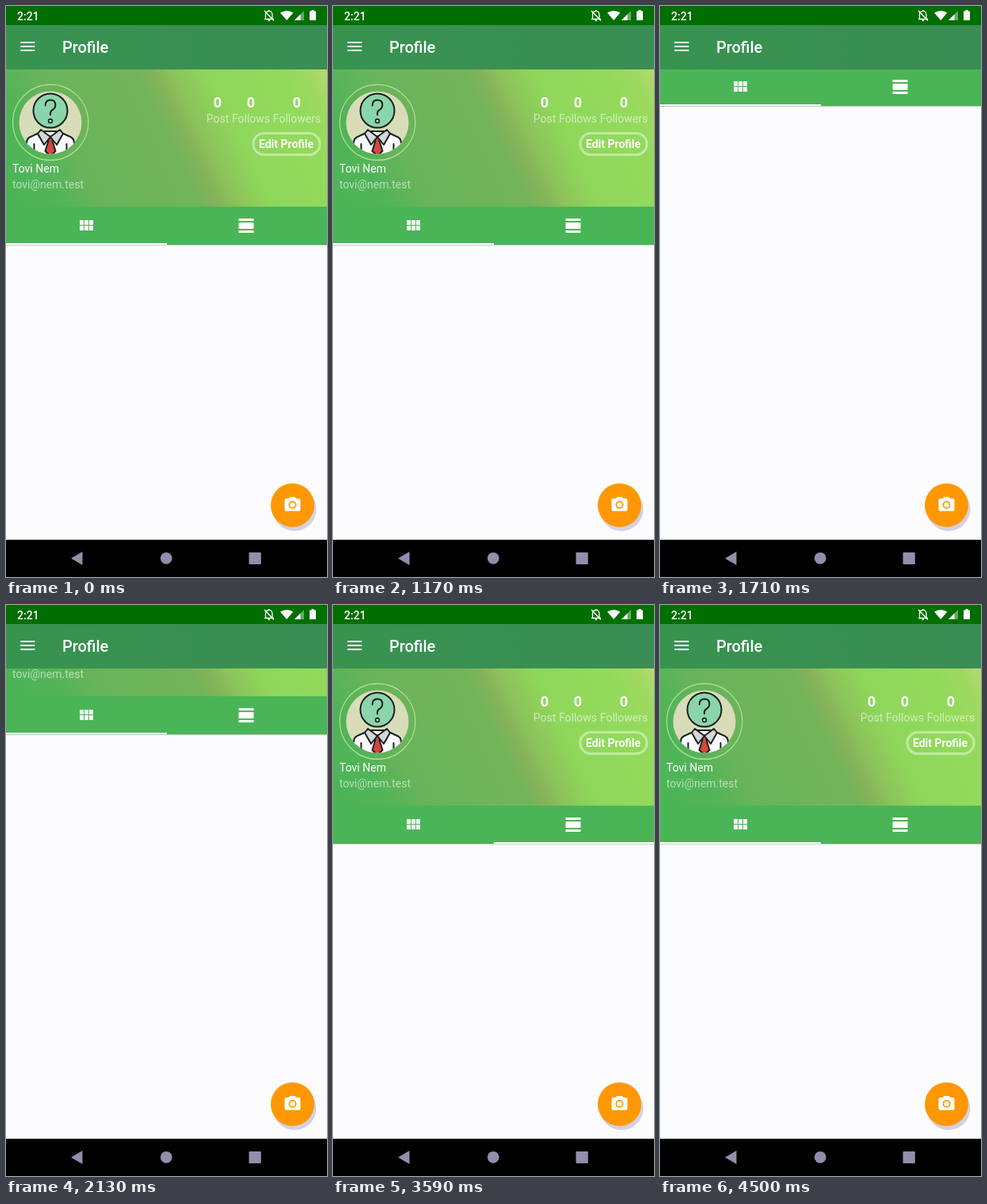
An HTML page for the animation above (4540 ms loop, 405 by 720 pixels).

```html
<!DOCTYPE html>
<html lang="en">
<head>
<meta charset="utf-8">
<title>Profile</title>
<style>
  html, body { margin: 0; width: 100%; height: 100%; overflow: hidden; background: #fcfcff; }
  #stage { position: relative; width: 405px; height: 720px; overflow: hidden; background: #fcfcff; }
  #scroll { position: absolute; left: 0; top: 80px; width: 405px; height: 222px; }
  #cover {
    height: 173px;
    background: linear-gradient(64deg, #4ab556 0%, #52b458 14%, #69b459 25%, #73b45a 51%,
      #84b259 55%, #8cc35a 60%, #8fd75b 69%, #93da5c 88%, #a0d962 95%, #b8d975 100%);
  }
  #tabs { height: 48px; background: #4ab556; border-bottom: 1px solid #c3cfcb; }
  #bar {
    position: absolute; left: 0; top: 24px; width: 405px; height: 56px;
    background: linear-gradient(90deg, #38934f, #3a8d55);
  }
  #mark { position: absolute; left: 0; top: 218.5px; width: 202.5px; height: 2px; background: #fff; }
  svg { position: absolute; left: 0; top: 0; display: block; }
  text { font-family: Roboto, sans-serif; font-size: 14px; fill: #fff; }
  .mid { text-anchor: middle; }
  .num { font-size: 18px; font-weight: 700; }
  .soft { fill: #fff; fill-opacity: .58; }
  .ink { stroke: #17211d; stroke-width: 2; stroke-linejoin: round; stroke-linecap: round; }
</style>
</head>
<body>
<div id="stage">
  <div id="scroll">
    <div id="cover"></div>
    <div id="tabs"></div>
    <svg width="405" height="222" viewBox="0 80 405 222" fill="#fff">
      <defs><clipPath id="disc"><circle cx="56" cy="147" r="39.5"/></clipPath></defs>
      <circle cx="56.2" cy="146.8" r="47.6" fill="none" stroke="#b4dfa0" stroke-width="1.2"/>
      <circle cx="56" cy="147" r="39.5" fill="#d8dcb9"/>
      <g clip-path="url(#disc)">
        <path class="ink" fill="#fbfbff" d="M26 190v-17q0-7 7-9l13-6h20l13 6q7 2 7 9v17z"/>
        <path class="ink" fill="none" d="M35.500 174v12M76.500 174v12"/>
        <path class="ink" fill="#d9443c" stroke-width="1.400" d="M52 164.500h8l-1.500 5.500 4 13-6.500 6-6.500-6 4-13z"/>
        <path class="ink" fill="#d5d6dc" d="M44 156l12 9-8 10-8-14zM68 156l-12 9 8 10 8-14z"/>
      </g>
      <circle class="ink" cx="56" cy="132" r="21.500" fill="#8bd5ac"/>
      <path class="ink" fill="none" d="M49.700 125.500q0-7 6.300-7t6.300 6.300q0 4-3.500 6t-2.800 6.500"/>
      <circle class="ink" cx="56" cy="145" r="2.400" fill="#c9ecd6" style="stroke-width:1.600"/>
      <text x="8" y="210">Tovi Nem</text>
      <text class="soft" x="8" y="229.500">tovi@nem.test</text>
      <g id="stats"></g>
      <rect x="312" y="160.500" width="84" height="27" rx="13.500" fill="none"
        stroke="#fff" stroke-opacity=".42" stroke-width="3.200"/>
      <text class="mid" x="353.500" y="179" font-weight="700">Edit Profile</text>
      <path transform="translate(89 265)" d="M4 11h5V5H4zM4 18h5v-6H4zM10 18h5v-6h-5zM16 18h5v-6h-5zM10 11h5V5h-5zM16 5v6h5V5z"/>
      <path transform="translate(291.500 265)" d="M2 21h19v-3H2zM20 8H3q-1 0-1 1v6q0 1 1 1h17q1 0 1-1V9q0-1-1-1zM2 3v3h19V3z"/>
    </svg>
    <div id="mark"></div>
  </div>
  <div id="bar"></div>
  <svg width="405" height="720" fill="#fff">
    <rect width="405" height="24" fill="#006e00"/>
    <text x="14" y="17.500" font-weight="500">2:21</text>
    <g fill="none" stroke="#fff" stroke-width="1.300">
      <path d="M327.500 16v-5q0-4 4-4.500t4.500 4.500v5M326 16.500h12M331.800 5v2M326 6l12 12.500"/>
    </g>
    <circle cx="331.800" cy="18" r="1.300"/>
    <path d="M346 8.500q8.200-5 16.400 0L354.200 18z"/>
    <path d="M376 6v12h-12z" opacity=".4"/>
    <path d="M371.500 10.500V18H364z"/>
    <path d="M385.500 5h3v1.500h2.500V18h-8V6.500h2.500z"/>
    <path transform="translate(15.300 39)" d="M3 18h18v-2H3zM3 13h18v-2H3zM3 6v2h18V6z"/>
    <text x="71" y="59" font-weight="500" style="font-size:20px">Profile</text>
    <circle cx="364" cy="634.500" r="27.500" fill="#d3d0e6"/>
    <circle cx="361.500" cy="629.500" r="27.500" fill="#ff9800"/>
    <g transform="translate(349.500 617)">
      <path fill-rule="evenodd" d="M9 2L7.170 4H4Q2 4 2 6v12q0 2 2 2h16q2 0 2-2V6q0-2-2-2h-3.170L15 2zM12 7a5 5 0 0 1 0 10a5 5 0 0 1 0-10z"/>
      <circle cx="12" cy="12" r="3.200"/>
    </g>
    <rect y="673" width="405" height="47" fill="#000"/>
    <g fill="#928eab">
      <path d="M82 696.500l14.500-8.500v17z"/>
      <circle cx="202.200" cy="696.300" r="7.400"/>
      <rect x="306.500" y="689" width="15.300" height="15" rx="1"/>
    </g>
  </svg>
</div>
<script>
  const LOOP = 4540;
  const $ = id => document.getElementById(id);

  $('stats').innerHTML = [['Post', 267], ['Follows', 309], ['Followers', 367]]
    .map(([label, x]) => `<text class="mid num" x="${x}" y="127.5">0</text>
      <text class="mid soft" x="${x}" y="147">${label}</text>`).join('');

  // Steps: [time in ms, offset in px, easing towards the next step]
  function move(el, axis, steps) {
    const frames = steps.map(([t, px, easing = 'linear']) =>
      ({ offset: t / LOOP, transform: `translate${axis}(${px}px)`, easing }));
    el.animate(frames, { duration: LOOP, iterations: Infinity });
  }

  const drag = 'cubic-bezier(.3,.2,.3,1)';
  const slide = 'cubic-bezier(.25,.1,.25,1)';

  move($('scroll'), 'Y', [
    [0, 0], [1220, 0, drag], [1620, -175], [2060, -175, drag], [2480, 0], [LOOP, 0]
  ]);
  move($('mark'), 'X', [
    [0, 0], [3220, 0, slide], [3520, 202.5], [3960, 202.5, slide], [4260, 0], [LOOP, 0]
  ]);
</script>
</body>
</html>
```
